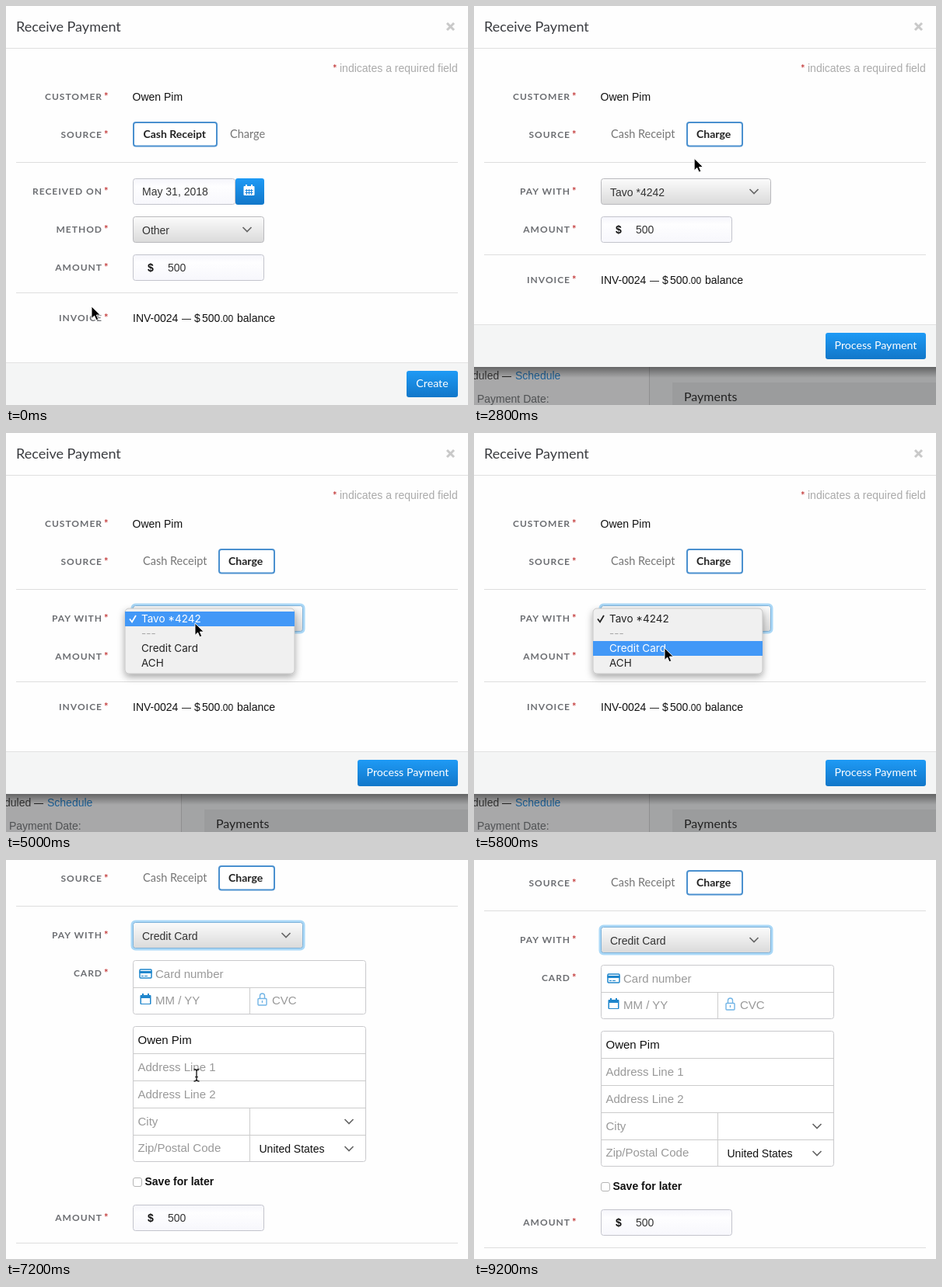
Write an HTML page that moves like this. It is 594 by 514 pixels and loops after 9.4 s.

```html
<!DOCTYPE html>
<html lang="en">
<head>
<meta charset="utf-8">
<title>Receive Payment</title>
<style>
  html, body { margin: 0; width: 100%; height: 100%; overflow: hidden; background: #fefefe; }
  svg { display: block; width: 594px; height: 514px; }
  text { font: 14px "Liberation Sans", Arial, sans-serif; fill: #111; white-space: pre; }
  .lato { font-family: Lato, sans-serif; }
  .label { font: 700 12px Lato, sans-serif; letter-spacing: 1px; fill: #6c6e72; text-anchor: end; }
  .star { font: 700 13px Lato, sans-serif; fill: #c43c3c; }
  .title { font: 18px Lato, sans-serif; fill: #3a3c40; }
  .off { font: 14.5px Lato, sans-serif; fill: #777; }
  .on { font: 700 14px Lato, sans-serif; fill: #222; }
  .button { font: 14.2px Lato, sans-serif; fill: #fff; text-anchor: middle; }
  .value { fill: #333; }
  .hint { font-size: 15px; fill: #999; }
  .big { font-size: 15px; }
  .menu { font: 13.5px Inter, sans-serif; fill: #222; }
  .white { fill: #fff; }
  .faint { fill: #aaa; }
  .bold { font-weight: 700; }
</style>
</head>
<body>
<svg viewBox="0 0 594 514">
  <defs>
    <linearGradient id="blue" x2="0" y2="1"><stop stop-color="#1e9af5"/><stop offset="1" stop-color="#1277c9"/></linearGradient>
    <linearGradient id="grey" x2="0" y2="1"><stop stop-color="#fbfbfb"/><stop offset="1" stop-color="#dadada"/></linearGradient>
    <linearGradient id="input" x2="0" y2="1"><stop stop-color="#f5f5fb"/><stop offset=".3" stop-color="#fefeff"/><stop offset="1" stop-color="#f7f7fc"/></linearGradient>
    <linearGradient id="shade" x2="0" y2="1"><stop stop-opacity=".4"/><stop offset="1" stop-opacity="0"/></linearGradient>
    <filter id="drop" x="-20%" y="-20%" width="140%" height="150%"><feDropShadow dx="0" dy="4" stdDeviation="5" flood-opacity=".35"/></filter>
  </defs>
  <g id="scene"></g>
  <g id="pointer"></g>
</svg>
<script>
const LOOP = 9400, STEP = 200;
const CUSTOMER = 'Owen Pim', SAVED_CARD = 'Tavo *4242';
const CHARGE_AT = 2400, MENU_AT = 3600, CARD_AT = 6200, TYPE_AT = 7000, GONE_AT = 9200;

const pointerPath = [[200, 110, 387], [1600, 305, 170], [2400, 305, 170], [3400, 243, 245],
  [5000, 243, 245], [5600, 245, 277], [8600, 245, 277], [9200, 420, 530]];
const scrollPath = [[6400, 0], [7200, 142], [7400, 142], [8000, 136]];

// Eased values of a keyframe list [time, ...values] at time t
function at(path, t) {
  const i = path.findIndex(key => key[0] > t);
  if (i === 0) return path[0].slice(1);
  if (i < 0) return path[path.length - 1].slice(1);
  const a = path[i - 1], b = path[i], p = (t - a[0]) / (b[0] - a[0]), e = p * p * (3 - 2 * p);
  return a.slice(1).map((v, k) => v + (b[k + 1] - v) * e);
}

const text = (x, y, s, cls = '') => `<text x="${x}" y="${y}" class="${cls}">${s}</text>`;
const rect = (x, y, w, h, fill, more = '') =>
  `<rect x="${x}" y="${y}" width="${w}" height="${h}" fill="${fill}" ${more}/>`;
const line = (d, color = '#ccc', width = 1) =>
  `<path d="${d}" fill="none" stroke="${color}" stroke-width="${width}"/>`;
const rule = y => line(`M13 ${y + .5}H581`, '#dedede');
const label = (y, s) => text(124, y, s, 'label') + text(126, y, '*', 'star');
const chevron = (x, y) => line(`M${x - 5.5} ${y - 3}l5.5 5.5 5.5-5.5`, '#666', 1.7);
const field = (y, w) => rect(163.5, y + .5, w, 33, 'url(#input)', 'rx="3" stroke="#c3c4cc"');
const button = (x, y, w, s) =>
  rect(x, y, w, 34, 'url(#blue)', 'rx="3"') + text(x + w / 2, y + 21, s, 'button');
const outline = (x, w) => rect(x, 150, w, 30.5, '#fff', 'rx="3" stroke="#4a90cf" stroke-width="2"');

function select(y, w, s, focused) {
  const glow = focused ? rect(162.5, y - .5, w + 2, 35, 'none', 'rx="4" stroke="#8ecbf5" stroke-width="4" opacity=".75"') : '';
  return glow + rect(163.5, y + .5, w, 33, 'url(#grey)', `rx="3" stroke="${focused ? '#7fb2d9' : '#b9b9bd'}"`)
    + text(175, y + 23, s, 'value') + chevron(163 + w - 21, y + 17);
}

const amount = y => label(y + 21, 'AMOUNT') + field(y, 168)
  + text(182, y + 22, '$', 'bold') + text(208, y + 22, '500', 'value');

const invoice = y => rule(y) + label(y + 37, 'INVOICE') + text(163, y + 38, 'INV-0024')
  + `<text x="226" y="${y + 38}" style="font-size:12px">—</text>`
  + text(242, y + 38, '$') + text(252, y + 38, '500')
  + `<text x="275.5" y="${y + 38}" style="font-size:12px">.00</text>` + text(297, y + 38, 'balance');

const footer = (y, x, s) => rect(0, y, 594, 55, '#f4f5f5') + line(`M0 ${y + .5}H594`, '#e2e2e2')
  + button(x, y + 11, 581 - x, s);

const calendar = (x, y, color, hole) => rect(x, y + 2, 14, 12, color, 'rx="1"')
  + line(`M${x + 3.5} ${y}v4m7-4v4`, color, 2) + hole;

function header(charge, hover) {
  const source = charge
    ? text(176, 170, 'Cash Receipt', 'off') + outline(274, 71) + text(286, 170, 'Charge', 'on')
    : outline(164, 107) + text(176.5, 170, 'Cash Receipt', 'on')
      + (hover ? rect(274, 149, 73, 32, '#619fdc', 'rx="3"') : '')
      + text(288, 170, 'Charge', hover ? 'off white' : 'off');
  return text(13, 33, 'Receive Payment', 'title') + line('M567 22l9 9m0-9l-9 9', '#c9c9c9', 3)
    + line('M0 54.5H594', '#e0e0e0') + text(420, 85, '*', 'star') + text(429, 85, 'indicates a required field', 'faint')
    + label(121, 'CUSTOMER') + text(162.5, 122, CUSTOMER) + label(170, 'SOURCE') + source + rule(201);
}

function cashForm() {
  const gaps = line('M307.5 237.5h10m-10 3h10', '#1a86de', 1) + line('M309.5 236v7m3-7v7m3-7v7', '#1a86de', 1);
  return label(243, 'RECEIVED ON') + field(222, 131) + text(175, 244, 'May 31, 2018', 'value')
    + rect(295, 222, 37, 34, 'url(#blue)', 'rx="3"') + calendar(305.5, 230, '#fff', gaps)
    + label(292, 'METHOD') + select(271, 168, 'Other')
    + amount(320) + invoice(369) + footer(459, 515, 'Create');
}

function backdrop() {
  return rect(0, 465, 594, 49, '#a3a4a5') + rect(0, 465, 225, 49, '#a8a8a9') + line('M225.5 465v49', '#8f8f90')
    + rect(255, 485, 339, 29, '#9b9c9d')
    + text(-2, 481, 'duled', 'value') + `<text x="36" y="481" style="font-size:12px">—</text>`
    + `<text x="53" y="481" style="fill:#1c5f95">Schedule</text>`
    + `<text x="4" y="511" style="fill:#505254">Payment Date:</text>`
    + `<text x="270" y="509" class="lato" style="font-size:16px;fill:#222">Payments</text>`
    + rect(0, 465, 594, 14, 'url(#shade)');
}

function menu(y) {
  const active = y < 249 ? 0 : y >= 268 ? 2 : -1;
  const items = [SAVED_CARD, '---', 'Credit Card', 'ACH'];
  return rect(153, 226, 218, 84, '#f0f0f0', 'rx="5" stroke="#b5b5b5" stroke-width=".7" filter="url(#drop)"')
    + (active < 0 ? '' : rect(153, 230 + 19 * active, 218, 19, '#4298f7'))
    + items.map((s, i) => text(174, 244 + 19 * i, s, 'menu ' + (i === active ? 'white' : i === 1 ? 'faint' : ''))).join('')
    + line('M159 239.5l3 4 5-8.5', active === 0 ? '#fff' : '#222', 1.8);
}

const chargeForm = open => label(243, 'PAY WITH') + select(222, 218, SAVED_CARD, open)
  + amount(271) + invoice(320) + footer(410, 452, 'Process Payment') + backdrop();

function cardForm() {
  const group = (y, h) => rect(163.5, y + .5, 299, h, '#fff', 'rx="3" stroke="#c9c9cc"');
  const icons = rect(172, 283, 15, 11, '#fff', 'rx="1" stroke="#1f86cc" stroke-width="1.5"')
    + rect(171.5, 285, 16, 3, '#1f86cc') + line('M174 291.5h3m1 0h4', '#1f86cc')
    + calendar(172.5, 314, '#1f86cc', rect(174, 320, 11, 7, '#fff'))
    + rect(324, 320.5, 11, 8.5, '#fff', 'rx="1" stroke="#72b5e6" stroke-width="1.4"')
    + line('M326.5 320v-3a3 3 0 0 1 6 0v3M329.5 323v3', '#72b5e6', 1.4);
  return label(243, 'PAY WITH') + select(222, 218, 'Credit Card', true) + label(292, 'CARD')
    + group(271, 69) + line('M163 306.5h299M313.5 306v34') + icons
    + text(192, 294, 'Card number', 'hint') + text(192, 328, 'MM / YY', 'hint') + text(342, 328, 'CVC', 'hint')
    + group(356, 174) + line('M163 391.5h299m-299 35h299m-299 35h299m-299 35h299M313.5 461v69')
    + text(169.5, 379, CUSTOMER, 'big')
    + ['Address Line 1', 'Address Line 2', 'City', 'Zip/Postal Code']
      .map((s, i) => text(169.5, [414, 449, 484, 518][i], s, 'hint')).join('')
    + text(325.5, 519, 'United States') + chevron(441, 479) + chevron(441, 514)
    + rect(163.5, 551.5, 11, 11, '#fff', 'rx="2.5" stroke="#b5b5b5"') + text(178.5, 561, 'Save for later', 'bold')
    + amount(586) + rule(635);
}

const cursors = {
  arrow: '<path d="M0 0V15.5l3.6-3.4 2.5 5.6 2.6-1.1-2.4-5.5h5z" stroke="#fff" stroke-width=".9"/>',
  hand: '<path d="M-1.3 1.3q1.3-2.2 2.6 0V6.5q1.2-1 2.4.3 1.3-.8 2.3.5 1.8-.6 2.4 1V12q0 2.5-1.6 5H0q-1.3-3-4.4-6 .3-2 3.1.2z" fill="#fff" stroke="#111" stroke-width="1.3"/><path d="M1.7 11v3.5m2.2-3.5v3.5m2.2-3.5v3.5" stroke="#111"/>',
  beam: '<path d="M-3.5-7.5q3.5 0 3.5 2.5 0-2.5 3.5-2.5M0-5V5.500M-3.500 8Q0 8 0 5.500 0 8 3.500 8M-1.800 2.500h3.600" fill="none" stroke="#222" stroke-width="1.4"/>'
};

const scene = document.getElementById('scene'), pointer = document.getElementById('pointer');
let shown = -1;

function draw(t) {
  const [x, y] = at(pointerPath, t);
  const charge = t >= CHARGE_AT, card = t >= CARD_AT, open = t >= MENU_AT && !card;
  const hover = !card && x > 274 && x < 347 && y > 149 && y < 181;
  scene.innerHTML = header(charge, hover)
    + (card ? cardForm() : charge ? chargeForm(open) : cashForm()) + (open ? menu(y) : '');
  scene.setAttribute('transform', `translate(0 ${-Math.round(at(scrollPath, t)[0])})`);
  pointer.innerHTML = t >= GONE_AT ? '' : cursors[hover ? 'hand' : t >= TYPE_AT ? 'beam' : 'arrow'];
  pointer.setAttribute('transform', `translate(${x} ${y})`);
}

function tick() {
  const t = Math.floor(performance.now() % LOOP / STEP) * STEP;
  if (t !== shown) draw(shown = t);
  requestAnimationFrame(tick);
}
tick();
</script>
</body>
</html>
```
